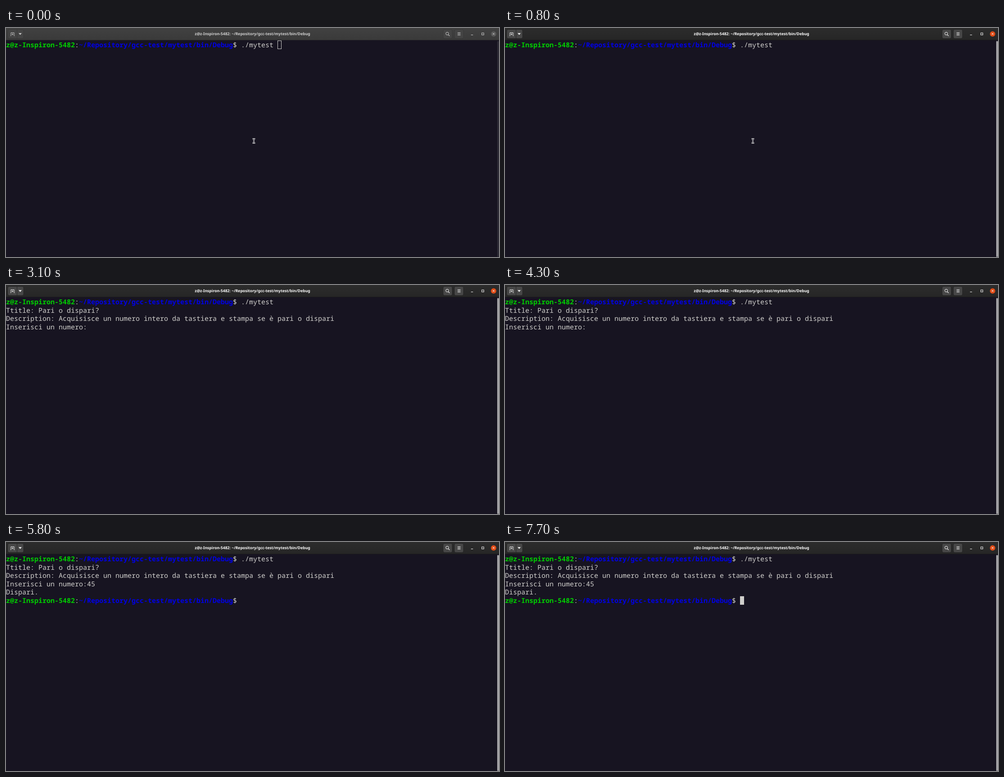
Recreate the animation shown at these times as an HTML page. Size 1095 by 511 pixels, loop 8000 ms.

```html
<!DOCTYPE html>
<html lang="it">
<head>
<meta charset="utf-8">
<title>Terminal</title>
<style>
  html, body { margin: 0; width: 100%; height: 100%; overflow: hidden; background: #171421; }
  svg { display: block; width: 1095px; height: 511px; }
  text { white-space: pre; text-rendering: geometricPrecision; }
  .term { font: 15px "Noto Sans Mono", "DejaVu Sans Mono", monospace; fill: #d0cfcc; }
  .user { font-weight: 700; fill: #00cd00; }
  .path { font-weight: 700; fill: #0000e4; }
  .title { font: 700 8.6px "Noto Sans", "Open Sans", sans-serif; fill: var(--ink); text-anchor: middle; }
  .button { fill: var(--button); stroke: var(--edge); stroke-width: .6; }
  .icon { fill: none; stroke: var(--ink); }
</style>
</head>
<body>
<svg id="stage" viewBox="0 0 1095 511">
  <defs>
    <linearGradient id="bar" x2="0" y2="1">
      <stop stop-color="var(--top)"/>
      <stop offset="1" stop-color="var(--bottom)"/>
    </linearGradient>
  </defs>
  <rect width="1095" height="511" fill="#171421"/>
  <rect width="1095" height="27" fill="url(#bar)"/>
  <rect y="26.4" width="1095" height=".8" fill="var(--edge)"/>
  <text class="title" id="title" x="547.5" y="16"></text>

  <g class="button">
    <path d="M24.5 3.3H7a3 3 0 0 0-3 3v14a3 3 0 0 0 3 3h17.5z"/>
    <path d="M24.5 3.3H36a3 3 0 0 1 3 3v14a3 3 0 0 1-3 3H24.5z"/>
    <rect x="971" y="3.3" width="20" height="20" rx="3"/>
    <rect x="996" y="3.3" width="20" height="20" rx="3"/>
  </g>
  <g class="icon">
    <path d="M10 17.5h1V10.500h7v7h1M14.500 12v4M12.500 14h4" stroke-width=".9"/>
    <path d="M28 11.500h7l-3.500 3.700z" fill="var(--ink)" stroke="none"/>
    <circle cx="980" cy="12.500" r="3.200"/>
    <path d="M982.300 14.800l3 3" stroke-width="1.200"/>
    <path d="M1003 10.500h6.500M1003 13.200h6.500M1003 15.900h6.500"/>
    <path d="M1032.800 15.500h4.500"/>
    <rect x="1056.800" y="11" width="4.500" height="4.500"/>
  </g>
  <circle cx="1083" cy="13.200" r="6" fill="var(--close)"/>
  <path class="icon" d="M1080.900 11.100l4.200 4.200m0-4.200l-4.200 4.200"/>

  <rect x="1091" y="29" width="4" height="482" rx="2" fill="var(--scroll)"/>
  <g id="screen" class="term"></g>
  <rect id="cursor" width="9" height="19"/>
  <g id="pointer" fill="none">
    <path d="M547.500 247.300h2.200l.8.800.8-.8h2.200M547.500 256.700h2.200l.8-.8.800.8h2.200M550.500 248v8" stroke="#eee" stroke-width="2.400"/>
    <path d="M547.500 247.300h2.200l.8.800.8-.8h2.200M547.500 256.700h2.200l.8-.8.800.8h2.200M550.500 248v8" stroke="#171421" stroke-width=".8"/>
  </g>
</svg>
<script>
const LOOP = 8000, CELL = 9, ROW = 18.6, TOP = 28;
const USER = 'z@z-Inspiron-5482', PATH = '~/Repository/gcc-test/mytest/bin/Debug';
const PROMPT = `<tspan class="user">${USER}</tspan>:<tspan class="path">${PATH}</tspan>$ `;
const INTRO = [
  PROMPT + './mytest ',
  'Ttitle: Pari o dispari?',
  'Description: Acquisisce un numero intero da tastiera e stampa se è pari o dispari'
];
const QUESTION = 'Inserisci un numero:';
const BLINKS = [800, 1300, 1900, 2600, 3100, 3800, 4300, 4500, 5800, 6400, 7000, 7700];

// Window colours as focus arrives: [start, colours]
const THEMES = [
  [0, { top: '#414141', bottom: '#3a3a3a', button: '#444', edge: '#333', ink: '#d0d0d0', close: '#585858', scroll: '#2b2934' }],
  [200, { top: '#2f2f2f', bottom: '#292929', button: '#393939', edge: '#202020', ink: '#fff', close: '#df4b16', scroll: '#a4a3a6' }],
  [300, { top: '#2d2d2d', bottom: '#272727', button: '#414141', edge: '#1d1d1d', ink: '#fff', close: '#df4b16', scroll: '#a4a3a6' }],
  [400, { top: '#2c2c2c', bottom: '#262626', button: '#474747', edge: '#1b1b1b', ink: '#fff', close: '#df4b16', scroll: '#a4a3a6' }]
];

const byId = id => document.getElementById(id);
const [stage, screen, cursor, pointer] = ['stage', 'screen', 'cursor', 'pointer'].map(byId);
byId('title').textContent = `${USER}: ${PATH}`;

function terminalLines(t) {
  if (t < 1300) return INTRO.slice(0, 1);
  const typed = '45'.slice(0, t < 4600 ? 0 : t < 4800 ? 1 : 2);
  const lines = [...INTRO, QUESTION + typed];
  return t < 5100 ? lines : [...lines, 'Dispari.', PROMPT];
}

function draw(t) {
  const theme = THEMES.findLast(([start]) => t >= start)[1];
  for (const name in theme) stage.style.setProperty('--' + name, theme[name]);

  const lines = terminalLines(t);
  const markup = lines.map((line, i) =>
    `<text x="0" y="${TOP + 15 + i * ROW}">${line}</text>`).join('');
  if (screen.dataset.markup !== markup) screen.innerHTML = screen.dataset.markup = markup;

  const focused = t >= 200, inset = focused ? 0 : .5;
  const column = lines.at(-1).replace(/<[^>]*>/g, '').length;
  const visible = BLINKS.filter(b => t >= b).length % 2 === 0;
  const shape = {
    x: column * CELL + inset,
    y: Math.round(TOP + (lines.length - 1) * ROW) + inset,
    width: CELL - 2 * inset,
    height: 19 - 2 * inset,
    fill: focused ? '#d0cfcc' : 'none',
    stroke: focused ? 'none' : '#d0cfcc',
    visibility: visible ? 'visible' : 'hidden'
  };
  for (const name in shape) cursor.setAttribute(name, shape[name]);
  pointer.setAttribute('visibility', t < 1300 ? 'visible' : 'hidden');
}

function tick() {
  draw(performance.now() % LOOP);
  requestAnimationFrame(tick);
}
tick();
</script>
</body>
</html>
```
